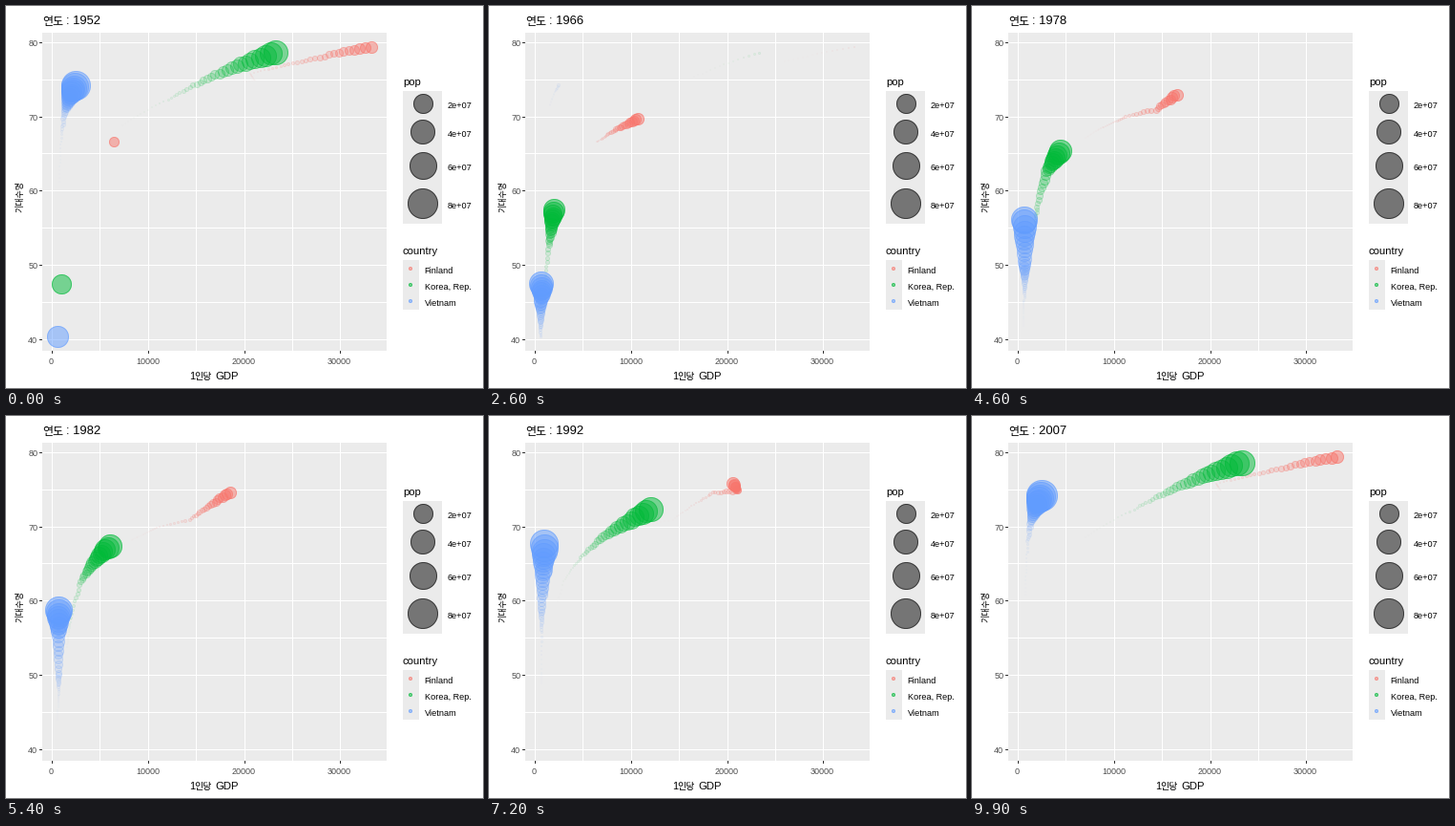
Animation of 500 by 400 pixels, one loop 10 s. Source, as a matplotlib script:

```python
import numpy as np
import matplotlib.pyplot as plt
from matplotlib.animation import FuncAnimation
from matplotlib.colors import to_rgb
from matplotlib.patches import Rectangle

W, H, DPI = 500, 400, 100
PT = 72 / DPI                      # points per pixel
FRAMES, STEP, WAKE = 100, 9, 49    # STEP: frames per five years
ALPHA = 0.5
GREY = "#EBEBEB"

# Turning points (five-year step, GDP per head, life expectancy)
# and first and last population in millions.
COUNTRIES = {
    "Finland": dict(
        color="#F8766D", pop=(4.09, 5.24),
        path=[(0, 6425, 66.55), (3, 10920, 69.8), (4, 14360, 70.9),
              (6, 18530, 74.55), (7, 21140, 74.8), (8, 20650, 75.7),
              (11, 33207, 79.31)]),
    "Korea, Rep.": dict(
        color="#00BA38", pop=(20.9, 49.0),
        path=[(0, 1030, 47.45), (1, 1490, 52.7), (3, 2030, 57.7),
              (4, 3030, 62.6), (8, 12100, 72.25), (11, 23348, 78.62)]),
    "Vietnam": dict(
        color="#619CFF", pop=(26.2, 85.3),
        path=[(0, 605, 40.41), (4, 700, 50.25), (5, 714, 55.75),
              (6, 707, 58.8), (8, 990, 67.65), (9, 1385, 70.65),
              (11, 2442, 74.25)]),
}
COLORS = np.array([to_rgb(c["color"]) for c in COUNTRIES.values()])

# GDP grows by a constant rate between turning points, the rest linearly.
t = np.arange(FRAMES) / STEP
GDP, LIFE, POP = [], [], []
for c in COUNTRIES.values():
    k, gdp, life = np.array(c["path"]).T
    GDP.append(np.exp(np.interp(t, k, np.log(gdp))))
    LIFE.append(np.interp(t, k, life))
    POP.append(np.linspace(*c["pop"], FRAMES))
GDP, LIFE, POP = (np.array(v).T for v in (GDP, LIFE, POP))


def scale(data, start, end):
    """Linear map of the data range, widened by 5 %, to pixels."""
    lo, hi = data.min(), data.max()
    pad = 0.05 * (hi - lo)
    return lambda v: start + (v - lo + pad) / (hi - lo + 2 * pad) * (end - start)


def point_size(pop):
    """Point size in mm, by area, from 5 to 15."""
    return 5 + 10 * np.sqrt((pop - POP.min()) / (POP.max() - POP.min()))


def diameter(size):
    """Whole-pixel diameter of a point."""
    return np.maximum(2, np.floor(0.75 * (size * 2.845 + 0.945) + 0.5))


sx = scale(GDP, 38.1, 399.6)
sy = scale(LIFE, 361.5, 28.5)
X, Y, SIZE = sx(GDP), sy(LIFE), point_size(POP)

plt.rcParams["font.family"] = ["Liberation Sans", "Noto Sans CJK JP"]
fig = plt.figure(figsize=(W / DPI, H / DPI), dpi=DPI, facecolor="white")
ax = fig.add_axes([0, 0, 1, 1])
ax.set_xlim(0, W)
ax.set_ylim(H, 0)
ax.axis("off")


def text(x, y, s, size, color="black", **kw):
    kw = {"ha": "left", "va": "baseline", **kw}
    return ax.text(x, y, s, fontsize=size * PT, color=color, **kw)


def box(x0, y0, x1, y1):
    ax.add_patch(Rectangle((x0, y0), x1 - x0, y1 - y0, fc=GREY, lw=0, zorder=0))


def line(xs, ys, color):
    ax.plot(xs, ys, color=color, lw=PT, snap=False,
            solid_capstyle="butt", zorder=1)


def dots(zorder=3):
    return ax.scatter([], [], zorder=zorder)


def place(coll, x, y, size, rgb, alpha):
    """Each dot is a translucent disc with a translucent ring over it."""
    d = diameter(size)
    shift = d / 2 - np.floor(d / 2)
    xy = np.column_stack([np.floor(x) + shift, np.floor(y) + shift])
    n = len(d)
    fill = np.zeros((2 * n, 4))
    edge = np.zeros((2 * n, 4))
    fill[0::2] = edge[1::2] = np.column_stack([rgb, alpha])
    coll.set_offsets(np.repeat(xy, 2, axis=0))
    coll.set_sizes((np.column_stack([d, d - 1]).ravel() * PT) ** 2)
    coll.set_linewidths(np.tile([0, PT], n))
    coll.set_facecolors(fill)
    coll.set_edgecolors(edge)


# panel, grid and axes
box(38, 28, 399, 361)
for v in range(0, 35000, 5000):
    x = np.floor(sx(v)) + 0.5
    line([x, x], [28, 361], "white")
    if v % 10000 == 0:
        line([x, x], [361, 364], "#333333")
        text(x - 1, 374.8, str(v), 9, "#4D4D4D", ha="center")
for v in range(40, 81, 5):
    y = np.floor(sy(v)) + 0.5
    line([38, 399], [y, y], "white")
    if v % 10 == 0:
        line([35, 38], [y, y], "#333333")
        text(33.2, y + 3.5, str(v), 9, "#4D4D4D", ha="right")

text(191.8, 391, "1", 11)
text(197.5, 391, "인당", 10)
text(219.8, 391, "GDP", 11.2)
text(15.3, 199, "기대수명", 9, ha="center", va="center", rotation=90)
text(38.2, 20, "연도", 12)
title = text(63.4, 19, "", 13)

# size legend
text(415.8, 83, "pop", 11.2)
pops = np.arange(20, 81, 20)
sizes = point_size(pops)
edges = 89.1 + np.concatenate([[0], np.cumsum(sizes * 72 / 25.4)])
mids = (edges[:-1] + edges[1:]) / 2
box(416, 89, 457, 228)
place(dots(), np.full(4, 437.0), mids, sizes, np.zeros((4, 3)), np.full(4, ALPHA))
for m, p in zip(mids, pops):
    text(462.8, m + 4.3, f"{p * 1e6:.0e}", 9.2)

# colour legend
text(415.8, 260, "country", 11.2)
box(416, 266, 433, 318)
rows = 275.2 + 17.28 * np.arange(3)
place(dots(), np.full(3, 424.0), rows, np.full(3, 1.5), COLORS, np.full(3, ALPHA))
for y, name in zip(rows, COUNTRIES):
    text(438.7, y + 4.6, name, 9.2)

# moving points with their fading, shrinking wake
trail = dots(4)
back = np.arange(WAKE - 1, -1, -1)
fade = np.repeat((1 - back / WAKE) ** 3, 3)
wake_rgb = np.tile(COLORS, (WAKE, 1))


def draw(i):
    k = (i - back) % FRAMES
    place(trail, X[k].ravel(), Y[k].ravel(), SIZE[k].ravel() * fade,
          wake_rgb, ALPHA * fade)
    year = 1952 + 55 * i / (FRAMES - 1)
    title.set_text(f": {round(year)}")
    return trail, title


anim = FuncAnimation(fig, draw, frames=FRAMES, interval=100, repeat=True)
plt.show()
```
